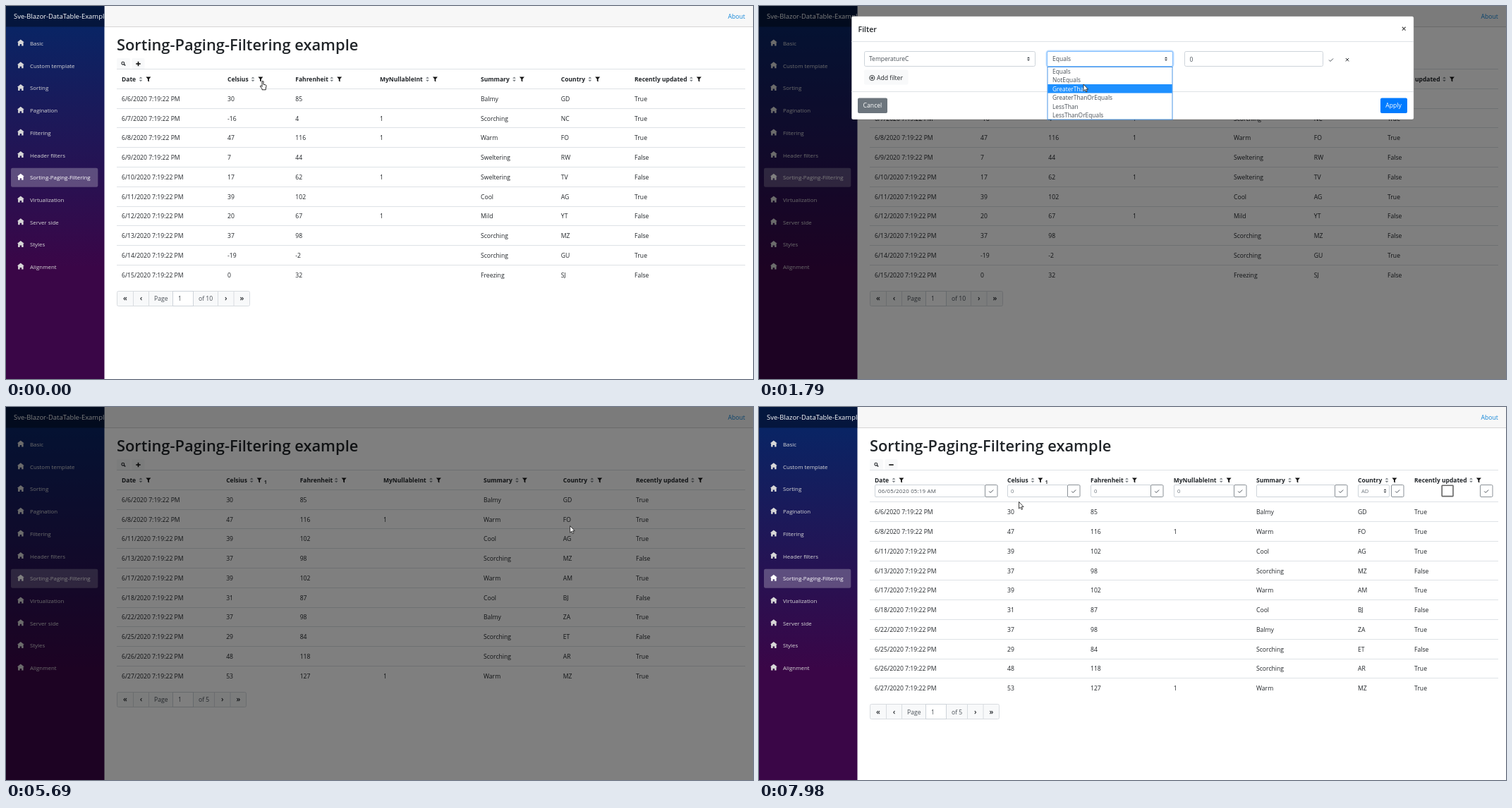
An HTML page for the animation above (8 s loop, 1059 px wide and 529 px high).

```html
<!DOCTYPE html>
<html lang="en">
<head>
<meta charset="utf-8">
<title>Sorting-Paging-Filtering example</title>
<style>
html, body { margin: 0; width: 100%; height: 100%; overflow: hidden; background: #fff; }
svg { display: block; width: 1059px; height: 529px; font-family: "Open Sans", "Noto Sans", sans-serif; }
text { white-space: pre; }
</style>
</head>
<body>
<svg id="stage" viewBox="0 0 1059 529"></svg>
<script>
const INK = '#212529', GREY = '#495057', LINE = '#dee2e6', FIELD = '#ced4da', LIGHT = '#f8f9fa';

const text = (x, y, s, { size = 8.65, fill = INK, weight = 400, more = '' } = {}) =>
  `<text x="${x}" y="${y}" font-size="${size}" fill="${fill}" font-weight="${weight}" ${more}>${s}</text>`;
const box = (x1, y1, x2, y2, fill, stroke = 'none', r = 0, more = '') =>
  `<rect x="${x1}" y="${y1}" width="${x2 - x1}" height="${y2 - y1}" fill="${fill}" stroke="${stroke}" rx="${r}" ${more}/>`;
const path = (d, x, y, fill, more = '') =>
  `<path d="${d}" transform="translate(${x} ${y})" fill="${fill}" ${more}/>`;
const stroke = (d, x, y, color, width) => path(d, x, y, 'none', `stroke="${color}" stroke-width="${width}"`);
const group = (id, body) => `<g id="${id}">${body}</g>`;
const snap = y => Math.floor(y) + 0.5;
const rule = (x1, x2, y, color = LINE) => stroke(`M${x1} 0H${x2}`, 0, snap(y), color, 1);
const arrows = (x, y, w, gap, color) =>
  path(`M${-w} ${-gap}L0 ${-gap - w}L${w} ${-gap}ZM${-w} ${gap}L0 ${gap + w}L${w} ${gap}Z`, x, y, color);
const check = (x, y) => stroke('M-3 0L-1 2L3 -2', x, y, GREY, 1);
const cross = (x, y, r, color, w) => stroke(`M${-r} ${-r}L${r} ${r}M${r} ${-r}L${-r} ${r}`, x, y, color, w);

function sidebar() {
  const items = ['Basic', 'Custom template', 'Sorting', 'Pagination', 'Filtering', 'Header filters',
    'Sorting-Paging-Filtering', 'Virtualization', 'Server side', 'Styles', 'Alignment'];
  let s = box(0, 0, 139.5, 529, 'url(#night)') + box(0, 0, 139.5, 29.5, 'rgba(0,0,0,.4)') +
    box(7, 229.7, 130.3, 256.7, 'rgba(255,255,255,.25)', 'none', 2.3);
  s += text(11, 18, 'Sve-Blazor-DataTable-Example', { size: 9.45, fill: '#fff', more: 'clip-path="url(#side)"' });
  items.forEach((name, i) => {
    const y = 53 + 31.7 * i, fill = i === 6 ? '#fff' : '#d7d7d7';
    s += path('M5 0L0 4h1.3v5h2.5v-2.5h2.5v2.5h2.5v-5h1.3z', 15.8, y - 5.4, fill) +
      text(34, y + 3, name, { size: 7.9, fill });
  });
  return s;
}

const HEADS = [['Date', 27], ['Celsius', 36], ['Fahrenheit', 51.5], ['MyNullableInt', 67.5],
  ['Summary', 47.5], ['Country', 41], ['Recently updated', 80.5]];

// Rows: day of June, Celsius, nullable value, summary, country, updated
const ALL = `6 30 - Balmy GD True|7 -16 1 Scorching NC True|8 47 1 Warm FO True|9 7 - Sweltering RW False
|10 17 1 Sweltering TV False|11 39 - Cool AG True|12 20 1 Mild YT False|13 37 - Scorching MZ False
|14 -19 - Scorching GU True|15 0 - Freezing SJ False`;
const WARM = `6 30 - Balmy GD True|8 47 1 Warm FO True|11 39 - Cool AG True|13 37 - Scorching MZ False
|17 39 - Warm AM True|18 31 - Cool BJ False|22 37 - Balmy ZA True|25 29 - Scorching ET False
|26 48 - Scorching AR True|27 53 1 Warm MZ True`;

function table(xs, data, pages, filtered, dy) {
  let s = rule(157, 1048, 89) + rule(157, 1048, 117.4 + dy);
  HEADS.forEach(([name, off], i) => {
    const x = xs[i];
    s += text(x, 107, name, { size: 8.5, weight: 700 }) + arrows(x + off, 103.8, 2.4, 1, '#7d8388') +
      path('M0 0H7L4.4 3.2V7L2.6 5.8V3.2Z', x + off + 7.4, 100.4, '#111');
  });
  if (filtered) s += text(xs[1] + 53.8, 109.3, '1', { size: 6.6, weight: 700 });
  data.split('|').forEach((row, i) => {
    const [day, c, n, summary, country, updated] = row.trim().split(' ');
    const y = 134.8 + dy + 27.77 * i;
    const f = 32 + Math.trunc(c / 0.5556);
    [`6/${day}/2020 7:19:22 PM`, c, f, n === '-' ? '' : n, summary, country, updated]
      .forEach((v, k) => { s += text(xs[k], y, v); });
    if (i) s += rule(157, 1048, 117.4 + dy + 27.77 * i);
  });
  return s + pager(pages, dy);
}

function pager(pages, dy) {
  const end = pages > 9 ? 300.5 : 295.5, y = snap(404 + dy), b = y + 21;
  let s = box(157.5, y, end + 45, b, LIGHT, '#d8dce0', 2) + box(236.5, y, 265.5, b, '#fff', FIELD);
  [180.5, 202.5, end, end + 22.5].forEach(x => { s += stroke('M0 0V21', x, y, '#d8dce0', 1); });
  const t = 418 + dy, sign = { size: 10.5, weight: 600, more: 'text-anchor="middle"' };
  return s + text(169, t, '«', sign) + text(191.5, t, '‹', sign) +
    text(end + 11.3, t, '›', sign) + text(end + 33.8, t, '»', sign) +
    text(210, t, 'Page', { fill: GREY }) + text(244, t, '1', { fill: GREY }) +
    text(273, t, 'of ' + pages, { fill: GREY });
}

function headerFilters() {
  const button = x => box(x + .5, 110.5, x + 18, 127.5, '#fff', '#8a9197', 1.5) + check(x + 9.2, 119.5);
  const field = (x1, x2, value, bx = x2) =>
    box(x1 + .5, 110.5, x2 + .5, 127.5, '#fff', FIELD, 1.5) +
    text(x1 + 5, 122, value, { size: 7.6, fill: '#6c757d' }) + button(bx);
  return box(164.5, 110.5, 320.5, 127.5, '#fff', FIELD, 1.5) + button(320) +
    text(169, 122, '06/05/2020 05:19 AM', { size: 7.9, fill: GREY, more: 'letter-spacing=".2"' }) +
    field(352, 437, '0') + field(470, 555, '0') + field(588, 673, '0') + field(705, 816, '') +
    field(849, 893, 'AD', 896) + arrows(887.5, 119, 2, .7, '#343a40') +
    box(968.2, 111.2, 984, 126.6, '#fff', '#666', .5, 'stroke-width="1.6"') + button(1022);
}

function dialog() {
  const label = { size: 8.5, fill: GREY };
  const ring = (id, x1, x2) => group(id, box(x1, 64.5, x2, 85.5, 'none', 'rgba(0,123,255,.25)', 2.5, 'stroke-width="4"') +
    box(x1, 64.5, x2, 85.5, '#fff', '#80bdff', 2));
  const names = ['Equals', 'NotEquals', 'GreaterThan', 'GreaterThanOrEquals', 'LessThan', 'LessThanOrEquals'];
  const list = box(409, 86.5, 586, 161, '#fff', '#4a96e6') + box(409.3, 111, 585.7, 123.5, '#1e90ff') +
    names.map((n, i) => text(416, 95.8 + 12.5 * i, n, { size: 8.4, fill: i === 2 ? '#fff' : GREY })).join('');
  return box(131.2, 14.5, 928.3, 161, '#fff', 'rgba(0,0,0,.2)', 2.5) +
    rule(131, 928, 50) + rule(131, 928, 121) +
    text(140.5, 36.8, 'Filter', { size: 10.6, weight: 600 }) + cross(914.2, 32.2, 2.4, '#555', 1.3) +
    box(149.5, 64.5, 391.5, 85.5, '#fff', FIELD, 2) + text(156, 78.3, 'TemperatureC', label) +
    arrows(382, 75, 2.1, .7, '#343a40') +
    box(408.5, 64.5, 586.5, 85.5, '#fff', FIELD, 2) + ring('selectRing', 408.5, 586.5) +
    text(416, 78.3, '', { ...label, more: 'id="operator"' }) + arrows(577, 75, 2.1, .7, '#343a40') +
    box(603.5, 64.5, 799.5, 85.5, '#fff', FIELD, 2) + ring('inputRing', 603.5, 799.5) +
    text(610.5, 78.5, '', { ...label, more: 'id="value"' }) +
    group('spinner', box(785, 70, 791.5, 80, '#eee') + arrows(788.2, 75, 1.7, 1.2, '#555')) +
    group('caret', stroke('M0 0V9', 0, 70.5, '#111', .9)) +
    check(811, 76.5) + cross(834, 76.2, 2.2, INK, 1) +
    box(149, 90.5, 211.5, 111.5, LIGHT, 'none', 2) +
    '<circle cx="160.3" cy="102" r="3.6" fill="none" stroke="#212529" stroke-width=".9"/>' +
    stroke('M-2 0H2M0 -2V2', 160.3, 102, INK, 1) + text(167, 104.5, 'Add filter') +
    box(140, 130.5, 182, 152, '#6c757d', 'none', 2) + text(147.6, 144.4, 'Cancel', { fill: '#fff' }) +
    box(881, 130.5, 919, 152, '#007bff', 'none', 2) + text(888.3, 144.4, 'Apply', { fill: '#fff' }) +
    group('list', list);
}

const stage = document.getElementById('stage');
stage.innerHTML = `<defs>
  <linearGradient id="night" x1="0" y1="0" x2="0" y2="1">
    <stop offset="0" stop-color="#052767"/><stop offset=".7" stop-color="#3a0647"/></linearGradient>
  <clipPath id="side"><rect width="139.5" height="30"/></clipPath></defs>` +
  box(139, 0, 1059, 29.5, '#f7f7f7') + rule(139, 1059, 29, '#d6d5d5') +
  text(1023.5, 18, 'About', { fill: '#1487d8' }) +
  text(157, 63, 'Sorting-Paging-Filtering example', { size: 21.87, weight: 600 }) +
  box(157, 74, 176, 90, LIGHT, 'none', 2) +
  '<circle cx="165.8" cy="81.2" r="1.9" fill="none" stroke="#212529" stroke-width="1.1"/>' +
  stroke('M0 0L2 2', 167.2, 82.6, INK, 1.4) +
  box(178.5, 74, 196.5, 90, LIGHT, 'none', 2, 'id="toggle"') +
  stroke('M-3.2 0H3.2', 187.5, 82, '#111', 1.6) +
  group('plus', stroke('M0 -3.2V3.2', 187.5, 82, '#111', 1.6)) +
  group('full', table([164, 314, 410.3, 530, 673, 786.8, 891], ALL, 10, false, 0)) +
  group('warm', table([164, 312.2, 416.7, 535, 677, 789.8, 893], WARM, 5, true, 0)) +
  group('wide', table([164, 352, 470, 587.7, 705, 849, 929], WARM, 5, true, 17.5) + headerFilters()) +
  sidebar() +
  box(0, 0, 1059, 529, '#000', 'none', 0, 'id="shade"') + group('dialog', dialog()) +
  group('pointer',
    group('arrow', path('M0 0V9.6L2.2 7.6L3.7 11L5.2 10.3L3.7 7.1H6.6Z', 0, 0, '#fff', 'stroke="#111" stroke-width=".8"')) +
    group('hand', path('M-1 0Q0 -1.2 1 0V4.2L4.4 5Q5.2 5.3 5 6.6L4.2 10V11.8H-1V10.4L-3.6 7Q-3.4 5.6 -2.2 6.2L-1 7.4Z',
      0, 0, '#fff', 'stroke="#111" stroke-width=".9"')));

const $ = Object.fromEntries([...stage.querySelectorAll('[id]')].map(e => [e.id, e]));
const show = (e, on) => e.setAttribute('display', on ? 'inline' : 'none');
const ramp = (t, a, b) => Math.min(1, Math.max(0, (t - a) / (b - a)));

// Pointer route: time, x, y
const ROUTE = [[0, 364, 107], [840, 364, 107], [1160, 351, 106], [1235, 351, 106], [1470, 456, 78],
  [1600, 456, 78], [1777, 460, 111], [2080, 460, 111], [2400, 617, 76], [2640, 484, 68], [3580, 484, 68],
  [3654, 502, 99], [3900, 650, 118], [4440, 811, 74], [4670, 811, 74], [5220, 899, 147], [5530, 899, 147],
  [5687, 800.5, 168.5], [5844, 578, 196.5], [6320, 430, 164], [6465, 430, 164], [7270, 187, 79],
  [7790, 187, 79], [7950, 368.5, 134.5], [8000, 368.5, 134.5]];
const HAND = [[0, 600], [4400, 4700], [5140, 5600], [7190, 7810]];

function pointerAt(t) {
  const i = ROUTE.findIndex(k => k[0] > t), [t0, x0, y0] = ROUTE[i - 1], [t1, x1, y1] = ROUTE[i];
  const p = (t - t0) / (t1 - t0);
  return [x0 + (x1 - x0) * p, y0 + (y1 - y0) * p];
}

function draw(now) {
  const clock = now % 8000;
  const t = Math.max(0, 370 + 78.2 * Math.floor((clock - 370) / 78.2 + .04));

  show($.full, t < 5560);
  show($.warm, t >= 5560 && t < 7480);
  show($.wide, t >= 7480);
  show($.plus, t < 7480);
  $.toggle.setAttribute('fill', t > 7190 && t < 7810 ? '#e2e6ea' : LIGHT);

  $.shade.setAttribute('opacity', .5 * (ramp(t, 450, 600) - ramp(t, 5690, 5840)));
  const out = ramp(t, 5530, 5680);
  const lift = Math.pow(1 - ramp(t, 611, 911), 1.75) + .6 * out;
  $.dialog.setAttribute('opacity', ramp(t, 611, 761) - out);
  $.dialog.setAttribute('transform', `translate(0 ${-28.4 * lift})`);

  show($.selectRing, t > 1530 && t < 2600);
  show($.list, t > 1530 && t < 2085);
  $.operator.textContent = t < 2085 ? 'Equals' : 'GreaterThan';
  const editing = t > 2600 && t < 4665;
  show($.inputRing, editing);
  show($.spinner, editing);
  $.value.textContent = t < 3180 ? '0' : t < 3260 ? '2' : '20';
  show($.caret, editing && t >= 3180);
  $.caret.setAttribute('transform', `translate(${t < 3260 ? 616 : 620.8} 0)`);

  const hand = HAND.some(([a, b]) => t >= a && t < b);
  show($.hand, hand);
  show($.arrow, !hand);
  $.pointer.setAttribute('transform', `translate(${pointerAt(t)})`);
  requestAnimationFrame(draw);
}
requestAnimationFrame(draw);
</script>
</body>
</html>
```
